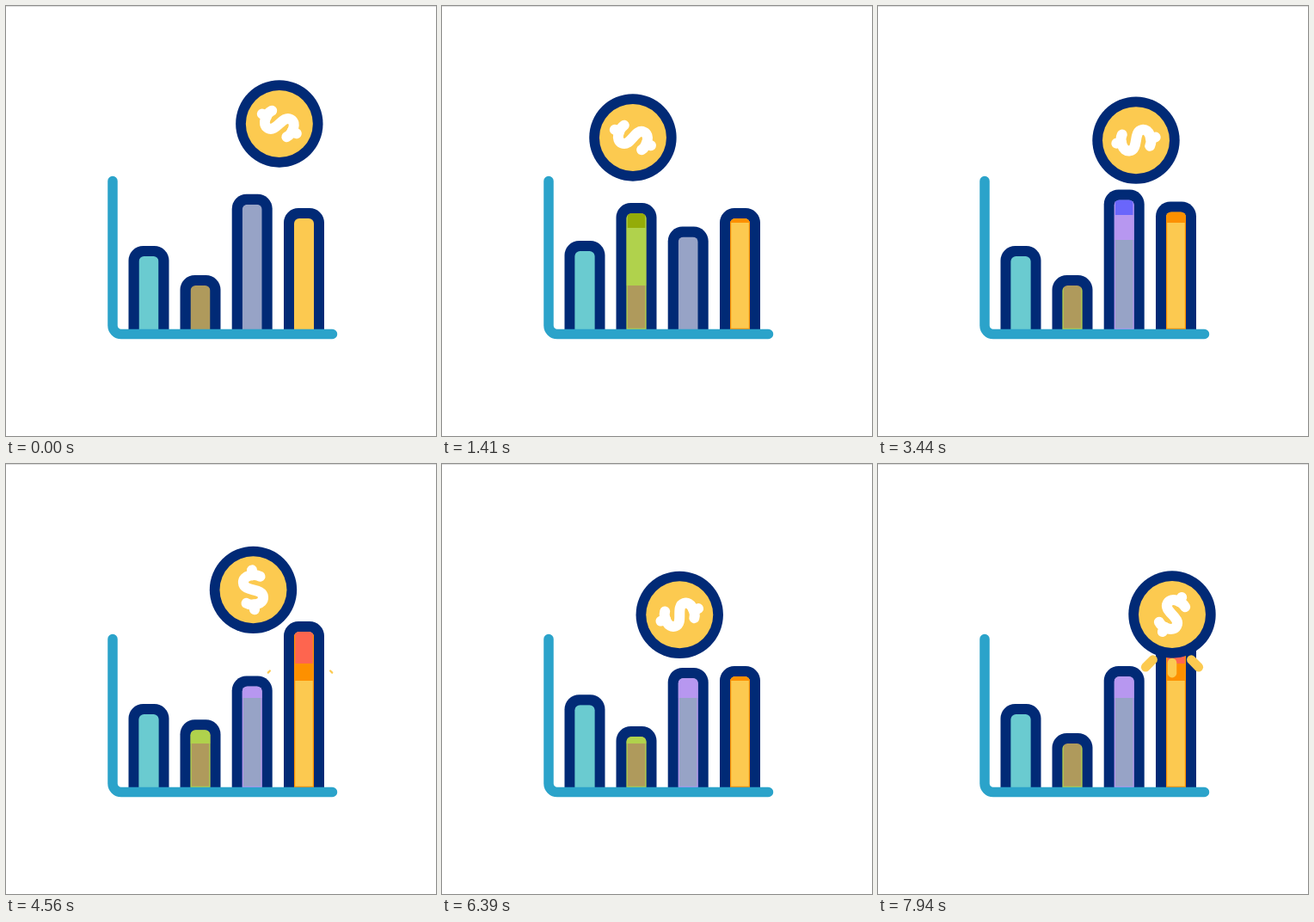
An HTML page with a canvas for the animation above (8000 ms loop, 500x500 px).

```html
<!DOCTYPE html>
<html lang="en">
<head>
<meta charset="utf-8">
<title>Coin hopping over a bar chart</title>
<style>
  html, body { margin: 0; width: 100%; height: 100%; overflow: hidden; background: #fff; }
  canvas { display: block; width: 100vw; height: 100vh; object-fit: contain; }
</style>
</head>
<body>
<canvas id="stage"></canvas>
<script>
const LOOP = 8000, CYCLE = 3720, HOP = CYCLE / 3, FIRST_LANDING = 380;
const FLOOR = 377;
const NAVY = '#012a76', GOLD = '#fcca50', AXIS = '#2ba3ca';

const canvas = document.getElementById('stage');
const ctx = canvas.getContext('2d');
const dpr = window.devicePixelRatio || 1;
canvas.width = canvas.height = 500 * dpr;

const wrap = t => (t % CYCLE + CYCLE) % CYCLE;
const clamp = u => Math.min(1, Math.max(0, u));
const mix = (a, b, u) => a + (b - a) * u;
const smooth = u => clamp(u) ** 2 * (3 - 2 * clamp(u));
const linear = u => u;
const easeIn = p => u => u ** p;
const easeOut = p => u => 1 - (1 - u) ** p;

// The coin lands every HOP ms, rolls from `from` to `to` while it rests,
// then flies to the next stop on an arc of the given height.
const stops = [
  { from: { x: 342, y: 175, turn: 30 }, to: { x: 342, y: 175, turn: 28 },
    rest: 270, height: 50, move: easeOut(2.7), spin: easeOut(1.7) },
  { from: { x: 220, y: 190, turn: -74 }, to: { x: 237, y: 198, turn: -110 },
    rest: 290, height: 23, move: linear, spin: linear },
  { from: { x: 286, y: 188, turn: -108 }, to: { x: 291, y: 181, turn: -106 },
    rest: 440, height: 41, move: linear, spin: easeIn(1.7) }
];

function coinPose(t) {
  const since = wrap(t - FIRST_LANDING);
  const i = Math.floor(since / HOP), age = since - i * HOP;
  const { from, to, rest, height, move, spin } = stops[i];
  if (age < rest) {
    const u = age / rest;
    return { x: mix(from.x, to.x, u), y: mix(from.y, to.y, u), turn: mix(from.turn, to.turn, u) };
  }
  const next = stops[(i + 1) % 3].from, u = (age - rest) / (HOP - rest);
  return {
    x: mix(to.x, next.x, move(u)),
    y: mix(to.y, next.y, u) - 4 * height * u * (1 - u),
    turn: mix(to.turn, next.turn, spin(u))
  };
}

// A pulse lifts a bar and lets it sink again. Bands give the lower edges of
// the colours that show above the base colour from `since` on.
const bars = [
  { x: 142.5, top: 279, base: '#6acbd0', since: 1300, edge: '#6acbd0',
    bands: [[262, '#46aacf']],
    pulses: [{ lift: 57, start: 1300, rise: 550, hold: 100, drop: 1000 }] },
  { x: 202.5, top: 313, base: '#af9a5c', since: 600, edge: '#b0d24c',
    bands: [[258, '#94ac08'], [325, '#b0d24c']],
    pulses: [{ lift: 84, start: 620, rise: 800, hold: 280, drop: 1200 }] },
  { x: 262.7, top: 256.5, base: '#97a3c6', since: 1500, edge: '#b797f0',
    bands: [[243, '#6a66fb'], [272, '#b797f0']],
    pulses: [{ lift: 44, start: 2300, rise: 800, hold: 180, drop: 1850 }] },
  { x: 323, top: 235, base: '#fcc950', since: 300, edge: '#fd9000',
    bands: [[232, '#fe654f'], [252, '#fd9000']],
    pulses: [{ lift: 52, start: 120, rise: 600, hold: 120, drop: 570 },
      { lift: 8, start: 3290, rise: 180, hold: 0, drop: 240 }] }
];

function barTop({ top, pulses }, t) {
  return pulses.reduce((y, { lift, start, rise, hold, drop }) => {
    const age = wrap(t - start);
    return y - lift * (smooth(age / rise) - smooth((age - rise - hold) / drop));
  }, top);
}

function line(x1, y1, x2, y2, width, color) {
  ctx.strokeStyle = color;
  ctx.lineWidth = width;
  ctx.beginPath();
  ctx.moveTo(x1, y1);
  ctx.lineTo(x2, y2);
  ctx.stroke();
}

function disc(r, color) {
  ctx.fillStyle = color;
  ctx.beginPath();
  ctx.arc(0, 0, r, 0, Math.PI * 2);
  ctx.fill();
}

function roundTop(x, y, w, bottom, r) {
  ctx.beginPath();
  ctx.roundRect(x, y, w, bottom - y, [r, r, 0, 0]);
}

function drawBar(bar, t) {
  const top = barTop(bar, t), x = bar.x + 12, y = top + 12;
  ctx.fillStyle = NAVY;
  roundTop(bar.x, top, 47, 382, 17);
  ctx.fill();

  ctx.save();
  roundTop(x, y, 23, FLOOR, 6);
  ctx.clip();
  ctx.fillStyle = bar.base;
  ctx.fillRect(x, y, 23, FLOOR - y);
  if (t > bar.since) {
    let from = 0;
    for (const [to, color] of bar.bands) {
      ctx.fillStyle = color;
      ctx.fillRect(x, from, 23, to - from);
      from = to;
    }
    ctx.strokeStyle = bar.edge;
    ctx.lineWidth = 2.5;
    ctx.strokeRect(x, y - 8, 23, FLOOR + 7 - y);
  }
  ctx.restore();
}

function drawAxis() {
  ctx.strokeStyle = AXIS;
  ctx.lineWidth = 11.5;
  ctx.beginPath();
  ctx.moveTo(124, 203.5);
  ctx.arcTo(124, 381.5, 379.5, 381.5, 10);
  ctx.lineTo(379.5, 381.5);
  ctx.stroke();
}

function drawCoin({ x, y, turn }) {
  ctx.save();
  ctx.translate(x, y);
  disc(50.7, NAVY);
  disc(39, GOLD);
  ctx.rotate(turn * Math.PI / 180);
  line(0, -23, 0, -17, 12, '#fff');
  line(0, 17, 0, 23, 12, '#fff');
  ctx.lineWidth = 12;
  ctx.beginPath();
  ctx.moveTo(9, -15);
  ctx.bezierCurveTo(3, -19, -11, -18, -11, -9);
  ctx.bezierCurveTo(-11, 2, 11, -2, 11, 9);
  ctx.bezierCurveTo(11, 18, -3, 19, -9, 15);
  ctx.stroke();
  ctx.restore();
}

// Three short strokes fly out from under the coin after each landing.
function drawSparks(t) {
  const life = 480, since = wrap(t - FIRST_LANDING);
  const i = Math.floor(since / HOP), age = since - i * HOP;
  if (age < 50 || age > life) return;
  const { from, to } = stops[i];
  const x = (from.x + to.x) / 2, y = to.y + 30;
  const dist = 33 + age * 0.04;
  const half = Math.min(age * 0.05, 9, (life - age) * 0.08);
  const width = 10.5 * clamp((life - age) / 90);
  for (const side of [-1, 0, 1]) {
    const dx = Math.sin(side * 0.78), dy = Math.cos(side * 0.78);
    const d = side ? dist : dist - Math.max(0, 10 - age * 0.035);
    line(x + dx * (d - half), y + dy * (d - half),
      x + dx * (d + half), y + dy * (d + half), width, GOLD);
  }
}

function draw(t) {
  ctx.setTransform(dpr, 0, 0, dpr, 0, 0);
  ctx.lineCap = 'round';
  ctx.lineJoin = 'round';
  ctx.fillStyle = '#fff';
  ctx.fillRect(0, 0, 500, 500);
  ctx.fillStyle = '#dedede';
  ctx.fillRect(0, 0, 500, 1);
  for (const bar of bars) drawBar(bar, t);
  drawAxis();
  drawCoin(coinPose(t));
  drawSparks(t);
}

const begin = performance.now();
function tick() {
  draw((performance.now() - begin) % LOOP);
  requestAnimationFrame(tick);
}
tick();
</script>
</body>
</html>
```
